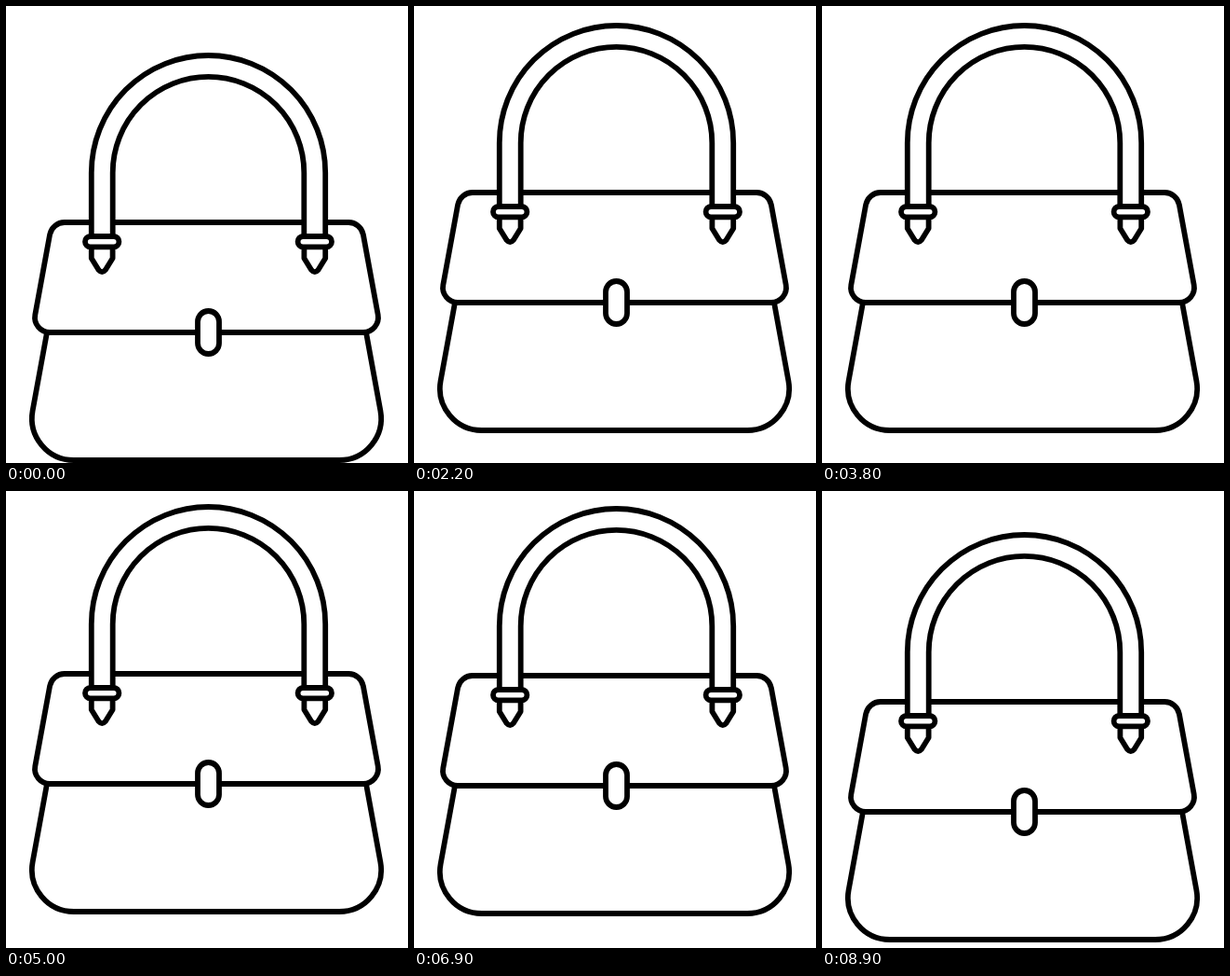
An HTML page that plays this animation: 432x490 px, repeating every 9 s.

```html
<!DOCTYPE html>
<html lang="en">
<head>
<meta charset="utf-8">
<title>Bouncing handbag</title>
<style>
  html, body { margin: 0; height: 100%; overflow: hidden; background: #fff; }
  svg { display: block; }
</style>
</head>
<body>
<svg width="432" height="490" viewBox="0 0 432 490">
  <defs>
    <g id="buckle">
      <path d="M91.8 217V230.500L99.700 243.200Q103.200 247.200 106.700 243.200L114.600 230.500V217Z"/>
      <rect x="85" y="207" width="36.400" height="11.300" rx="5.650"/>
    </g>
  </defs>
  <g id="bag" fill="#fff" stroke="#000" stroke-width="5.800" stroke-linejoin="round">
    <path d="M44 310L28.600 394A45 45 0 0 0 72.900 447H358.100A45 45 0 0 0 402.400 394L387 310"/>
    <path d="M63 192H368A16 16 0 0 1 383.900 205.100L399.700 291.100A16 16 0 0 1 384 310H47A16 16 0 0 1 31.300 291.100L47.100 205.100A16 16 0 0 1 63 192Z"/>
    <path d="M91.800 210V138.700A125.700 125.700 0 0 1 343.200 138.700V210H320.300V138.700A102.800 102.800 0 0 0 114.700 138.700V210Z"/>
    <use href="#buckle"/>
    <use href="#buckle" x="228.600"/>
    <rect x="206" y="287" width="23" height="46" rx="11.500"/>
  </g>
</svg>
<script>
  const bag = document.getElementById('bag');
  const PERIOD = 3000, STEP = 100, HEIGHT = 40;

  // Parabolic bounce: lowest at the start of each period, highest halfway.
  function draw(now) {
    const t = Math.floor(now / STEP) * STEP % PERIOD;
    const fromTop = 1 - t / (PERIOD / 2);
    const y = Math.floor(HEIGHT * fromTop * fromTop);
    bag.setAttribute('transform', `translate(0 ${y})`);
  }

  function frame() {
    draw(performance.now());
    requestAnimationFrame(frame);
  }
  frame();
</script>
</body>
</html>
```
